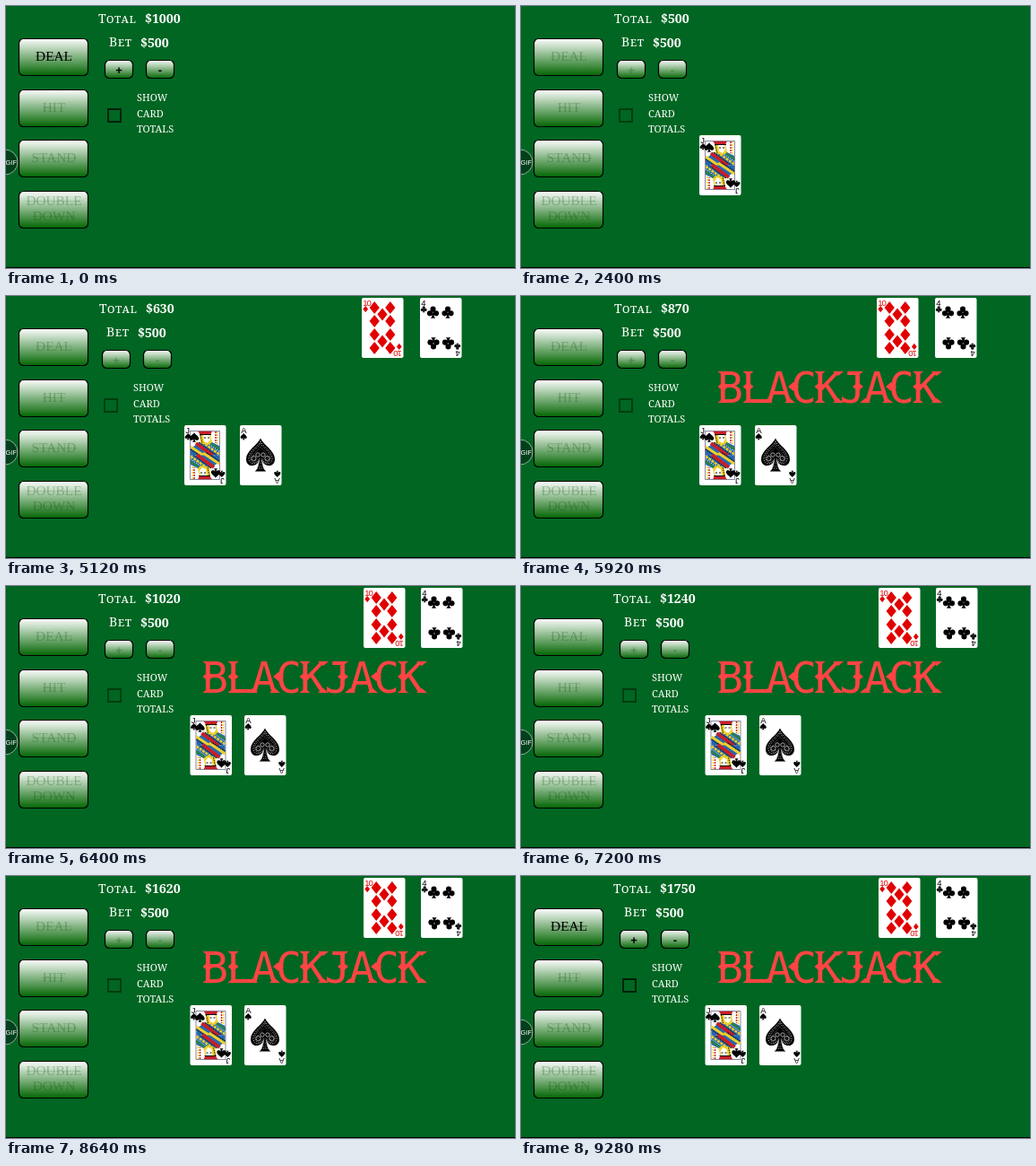
An HTML page with a canvas that plays this animation: 568x292 px, repeating every 9.44 s.

```html
<!DOCTYPE html>
<html lang="en">
<head>
<meta charset="utf-8">
<title>Blackjack</title>
<style>
  html, body { margin: 0; width: 100%; height: 100%; overflow: hidden; background: #006622; }
  canvas { display: block; }
</style>
</head>
<body>
<canvas id="table" width="568" height="292"></canvas>
<script>
const ctx = document.getElementById('table').getContext('2d');
const LOOP = 9440, STEP = 160;
const SERIF = '"Liberation Serif", serif', LABEL = '"Noto Serif", serif', SANS = '"Liberation Sans", sans-serif';
const FADED = 'rgba(0,80,0,.28)', RED = '#e00000';

const suits = {
  spade: new Path2D('M0-1C.2-.6 1-.25 1 .25C1 .75 .35 .75 .12 .4Q.15 .85 .4 1H-.4Q-.15 .85-.12 .4C-.35 .75-1 .75-1 .25C-1-.25-.2-.6 0-1Z'),
  club: new Path2D('M-.45-.5a.45 .45 0 1 0 .9 0a.45 .45 0 1 0-.9 0M-.97 .2a.45 .45 0 1 0 .9 0a.45 .45 0 1 0-.9 0M.07 .2a.45 .45 0 1 0 .9 0a.45 .45 0 1 0-.9 0M0-.3Q-.1 .8-.4 1H.4Q.1 .8 0-.3Z'),
  diamond: new Path2D('M0-1L.8 0L0 1L-.8 0Z')
};

function text(str, x, y, font, color, align = 'left', spacing = 0) {
  ctx.font = font;
  ctx.fillStyle = color;
  ctx.textAlign = align;
  ctx.letterSpacing = spacing + 'px';
  ctx.fillText(str, x, y);
}

function box(x, y, w, h, r, fill, stroke, line = 1.4) {
  ctx.beginPath();
  ctx.roundRect(x, y, w, h, r);
  if (fill) { ctx.fillStyle = fill; ctx.fill(); }
  if (stroke) { ctx.strokeStyle = stroke; ctx.lineWidth = line; ctx.stroke(); }
}

function poly(color, ...points) {
  ctx.beginPath();
  for (let i = 0; i < points.length; i += 2) ctx.lineTo(points[i], points[i + 1]);
  ctx.fillStyle = color;
  ctx.fill();
}

function stroke(color, width, dash, x1, y1, x2, y2) {
  ctx.beginPath();
  ctx.moveTo(x1, y1);
  ctx.lineTo(x2, y2);
  ctx.setLineDash(dash);
  ctx.strokeStyle = color;
  ctx.lineWidth = width;
  ctx.stroke();
  ctx.setLineDash([]);
}

function ring(x, y, r, color, line = 1) {
  ctx.beginPath();
  ctx.arc(x, y, r, 0, 2 * Math.PI);
  ctx.strokeStyle = color;
  ctx.lineWidth = line;
  ctx.stroke();
}

function pip(suit, x, y, size, color = '#000') {
  ctx.save();
  ctx.translate(x, y);
  ctx.scale(size, size);
  ctx.fillStyle = color;
  ctx.fill(suits[suit]);
  ctx.restore();
}

// Draws something upright and again turned by 180 degrees about the card's centre.
function twice(draw) {
  draw();
  ctx.save();
  ctx.translate(46, 67);
  ctx.rotate(Math.PI);
  draw();
  ctx.restore();
}

function card(x, y, rank, suit, face) {
  const color = suit === 'diamond' ? RED : '#000';
  ctx.save();
  ctx.translate(x, y);
  box(0, 0, 46.5, 67, 2, '#fff');
  face();
  twice(() => {
    text(rank, 1.2, 8.5, '9.5px ' + SANS, color, 'left', rank.length > 1 ? -1 : 0);
    pip(suit, 4.2, 12.6, 3.6, color);
  });
  ctx.restore();
}

const four = () => {
  for (const x of [14.5, 31]) twice(() => pip('club', x, 16, 6.8));
};

const ten = () => twice(() => {
  for (const x of [14.2, 31.8]) for (const y of [11, 26]) pip('diamond', x, y, 7, RED);
  pip('diamond', 23, 18.5, 7, RED);
});

const ace = () => {
  ctx.save();
  ctx.translate(23, 33);
  ctx.scale(16, 18.5);
  ctx.fillStyle = '#000';
  ctx.fill(suits.spade);
  ctx.strokeStyle = '#ddd';
  ctx.lineWidth = .06;
  ctx.setLineDash([.08, .1]);
  for (const k of [.82, .85, .72]) {
    ctx.scale(k, k);
    ctx.stroke(suits.spade);
  }
  ctx.restore();
  for (const side of [-1, 1]) {
    ring(23 + side * 7.5, 37, 2.6, '#ccc', .8);
    ring(23 + side * 3, 33, 2.2, '#ccc', .8);
  }
};

const jack = () => {
  box(6.5, 6.5, 33, 54, 0, '#fff', '#557', .7);
  ctx.save();
  ctx.beginPath();
  ctx.rect(6.5, 6.5, 33, 54);
  ctx.clip();
  twice(() => {
    poly('#2468b0', 7, 33.5, 7, 26, 17, 19, 31, 19, 39, 23, 39, 33.5);
    stroke('#f0cf28', 3, [], 7, 24, 25, 36);
    stroke('#111', 1.2, [1.5, 1], 7, 27, 22, 37);
    stroke('#c81e28', 4, [], 13, 20, 32, 34);
    stroke('#111', 1, [2, 1], 16, 19, 36, 34);
    stroke('#f0cf28', 2.5, [3, 1], 20, 19, 40, 33);
    stroke('#2a8050', 3, [], 29, 20, 40, 27);
    stroke('#fff', 1, [1, 1.5], 26, 20, 40, 30);
    poly('#f0cf28', 17, 10, 29, 10, 31, 19, 27, 22, 18, 20);
    poly('#fff', 21, 11, 28, 11, 29, 16, 26, 20, 22, 18);
    poly('#c81e28', 15, 6.5, 31, 6.5, 29, 11, 18, 11);
    stroke('#111', 1, [], 17, 10.5, 30, 10.5);
    stroke('#111', 1, [2, 2], 22, 14, 28, 14);
    stroke('#111', 1, [1.5, 1], 18, 11, 20, 20);
    stroke('#c81e28', 1.5, [2, 1], 35, 7, 35, 20);
    stroke('#f0cf28', 1.5, [2, 1], 37, 7, 37, 22);
  });
  ctx.restore();
  twice(() => pip('spade', 11, 13.5, 5.2));
};

function button(x, y, w, h) {
  const shade = ctx.createLinearGradient(0, y, 0, y + h);
  shade.addColorStop(0, '#fff');
  shade.addColorStop(1, '#006400');
  box(x + .5, y + .5, w - 1, h - 1, 5, shade, '#000', 1.2);
}

function caption(str, y, color) {
  text(str, 53.5, y, '15.3px ' + SERIF, color, 'center');
  const half = ctx.measureText(str).width / 2;
  ctx.globalAlpha = .5;
  ctx.fillRect(53.5 - half, y - 5, half * 2, 1);
  ctx.globalAlpha = 1;
}

// Winnings are counted up in tens.
function totalAt(t) {
  if (t < 800) return 1000;
  const keys = [[4690, 500], [5120, 630], [6400, 1020], [8000, 1450], [9120, 1750]];
  if (t <= keys[0][0]) return 500;
  for (let i = 1; i < keys.length; i++) {
    const [t0, v0] = keys[i - 1], [t1, v1] = keys[i];
    if (t <= t1) return Math.round((v0 + (v1 - v0) * (t - t0) / (t1 - t0)) / 10) * 10;
  }
  return 1750;
}

function controls(t, total, narrow) {
  const active = t < 800 || t >= 9280;
  const ink = active ? '#000' : t < 960 ? 'rgba(0,40,0,.6)' : FADED;
  for (const y of [36, 93, 149, 206]) button(14, y, 78, 42);
  caption('DEAL', 60.5, ink);
  caption('HIT', 118, FADED);
  caption('STAND', 174, FADED);
  caption('DOUBLE', 222, FADED);
  caption('DOWN', 239, FADED);

  const label = 'small-caps 14px ' + LABEL, amount = 'bold 14.2px ' + LABEL;
  text('Total', 103 + narrow, 18.5, label, '#fff', 'left', .6);
  text('$' + total, 155 + narrow, 19, amount, '#fff');
  const shift = -3 * narrow;
  text('Bet', 115 + shift, 45, label, '#fff', 'left', .6);
  text('$500', 150 + shift, 45.5, amount, '#fff');
  button(110 + shift, 60, 32, 21);
  button(156 + shift, 60, 32, 21);
  text('+', 126 + shift, 76, 'bold 13px ' + SANS, ink, 'center');
  text('-', 172 + shift, 76, 'bold 13px ' + SANS, ink, 'center');

  const left = -4 * narrow;
  box(114 + left, 115, 14, 14, 0, null, active ? '#002008' : '#003c10', 1.8);
  ['SHOW', 'CARD', 'TOTALS'].forEach((word, i) =>
    text(word, 146 + left, 106 + i * 17.5, '11px ' + LABEL, '#fff'));
}

function cards(t, narrow) {
  if (t >= 2400) card(narrow ? 199 : 205.5, 144, 'J', 'spade', jack);
  if (t >= 3680) card(narrow ? 261 : 266, 144, 'A', 'spade', ace);
  if (t >= 4480) {
    card(narrow ? 397 : 399, 2, '10', 'diamond', ten);
    card(narrow ? 462 : 463, 2, '4', 'club', four);
  } else if (t >= 3200) card(477, 2, '4', 'club', four);
}

// Plain capitals with spurs and wedge serifs.
function banner() {
  const color = '#ff4444', top = 84, middle = 101, base = 119;
  text('BLACKJACK', 219, base, '48px "DejaVu Sans Mono", monospace', color, 'left', -1.6);
  for (const x of [225.5, 253.5, 304, 333.5, 376, 413, 443])
    poly(color, x - 6, middle, x, middle - 5, x + 6, middle, x, middle + 5);
  for (const x of [225.5, 253.5, 333.5, 354, 376, 443, 464])
    poly(color, x - 6, top, x + 6, top, x, top + 5);
  for (const x of [225.5, 253.5, 275, 300, 333.5, 354, 384, 409, 443, 464])
    poly(color, x - 6, base, x + 6, base, x, base - 5);
}

function badge() {
  ctx.beginPath();
  ctx.arc(-1, 174, 14, 0, 2 * Math.PI);
  ctx.fillStyle = '#00401a';
  ctx.fill();
  ring(-1, 174, 14, '#8fb09a', 1);
  text('GIF', -.5, 176.8, '7.5px ' + SANS, '#fff');
}

function frame() {
  const t = Math.floor(performance.now() % LOOP / STEP) * STEP;
  const total = totalAt(t), narrow = total < 1000 ? 1 : 0;
  ctx.fillStyle = '#006622';
  ctx.fillRect(0, 0, 568, 292);
  ctx.fillStyle = '#000';
  ctx.fillRect(0, 291, 568, 1);
  controls(t, total, narrow);
  cards(t, narrow);
  if (t >= 5760) banner();
  badge();
  requestAnimationFrame(frame);
}
frame();
</script>
</body>
</html>
```
